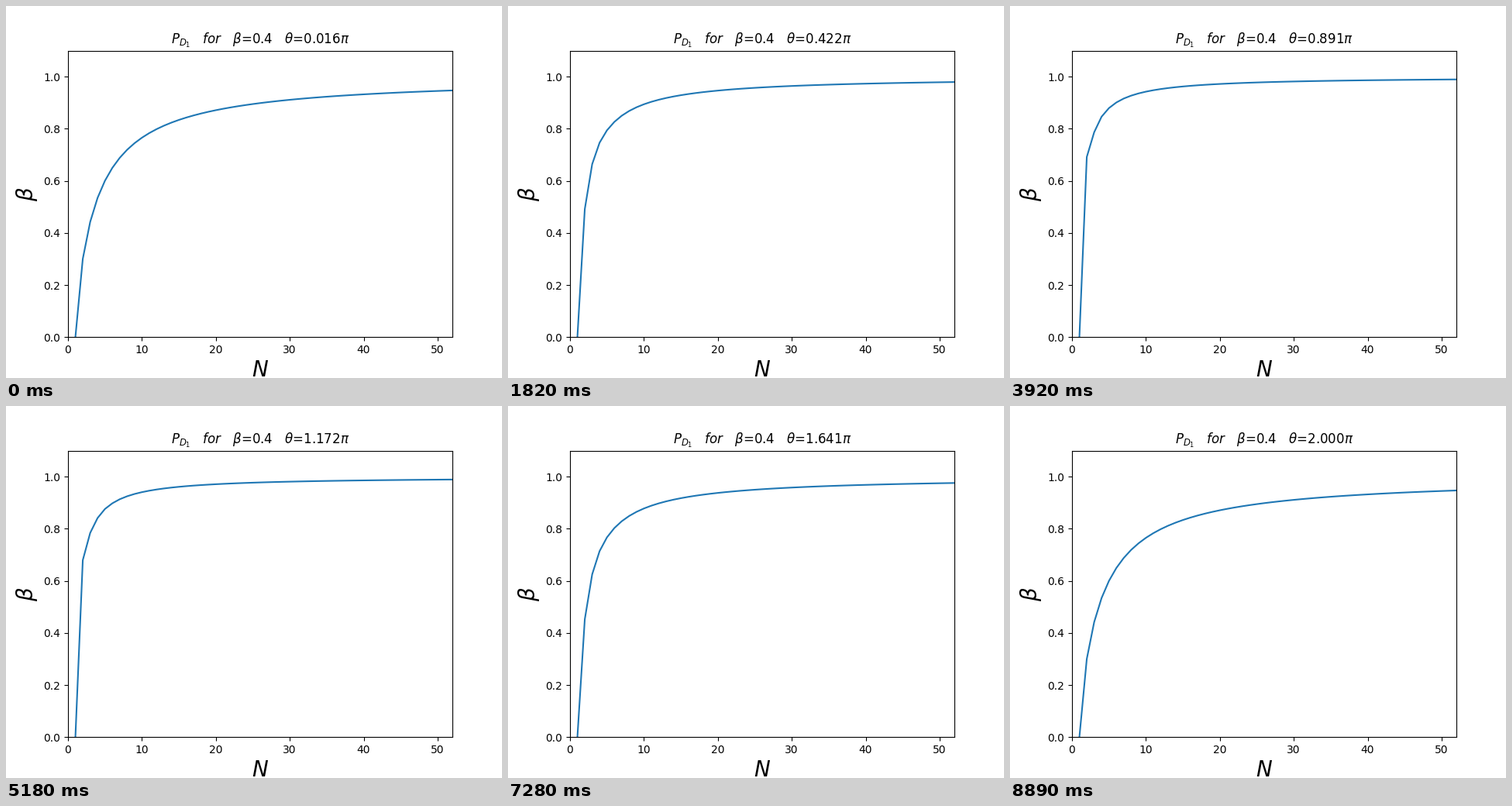
A matplotlib script that plays this animation: 640 by 480 pixels, repeating every 8960 ms.

```python
import numpy as np
import matplotlib.pyplot as plt
from matplotlib.animation import FuncAnimation

BETA = 0.4
FRAMES = 128
STAGES = np.arange(1, 54)


def amplitude(n, theta):
    """Modulus of the upper-arm amplitude after n beam splitters."""
    c, s = np.cos(np.pi / (2 * n)), np.sin(np.pi / (2 * n))
    loss = BETA * np.exp(1j * theta)
    up, low = 1, 0
    for _ in range(n):
        up, low = c * up - s * low, loss * (s * up + c * low)
    return abs(up)


fig, ax = plt.subplots(figsize=(6.4, 4.8), dpi=100)
line, = ax.plot([], [])
ax.set_xlim(0, 52)
ax.set_ylim(0, 1.1)
ax.set_xlabel(r"$N$", fontsize=20)
ax.set_ylabel(r"$\beta$", fontsize=20)


def update(i):
    turn = 2 * (i + 1) / FRAMES
    line.set_data(STAGES, [amplitude(n, turn * np.pi) for n in STAGES])
    ax.set_title(rf"$P_{{D_1}}$   $for$   $\beta$={BETA}   $\theta$={turn:.3f}$\pi$")
    return line,


anim = FuncAnimation(fig, update, frames=FRAMES, interval=70,
                     repeat=True, repeat_delay=0)
plt.show()
```
